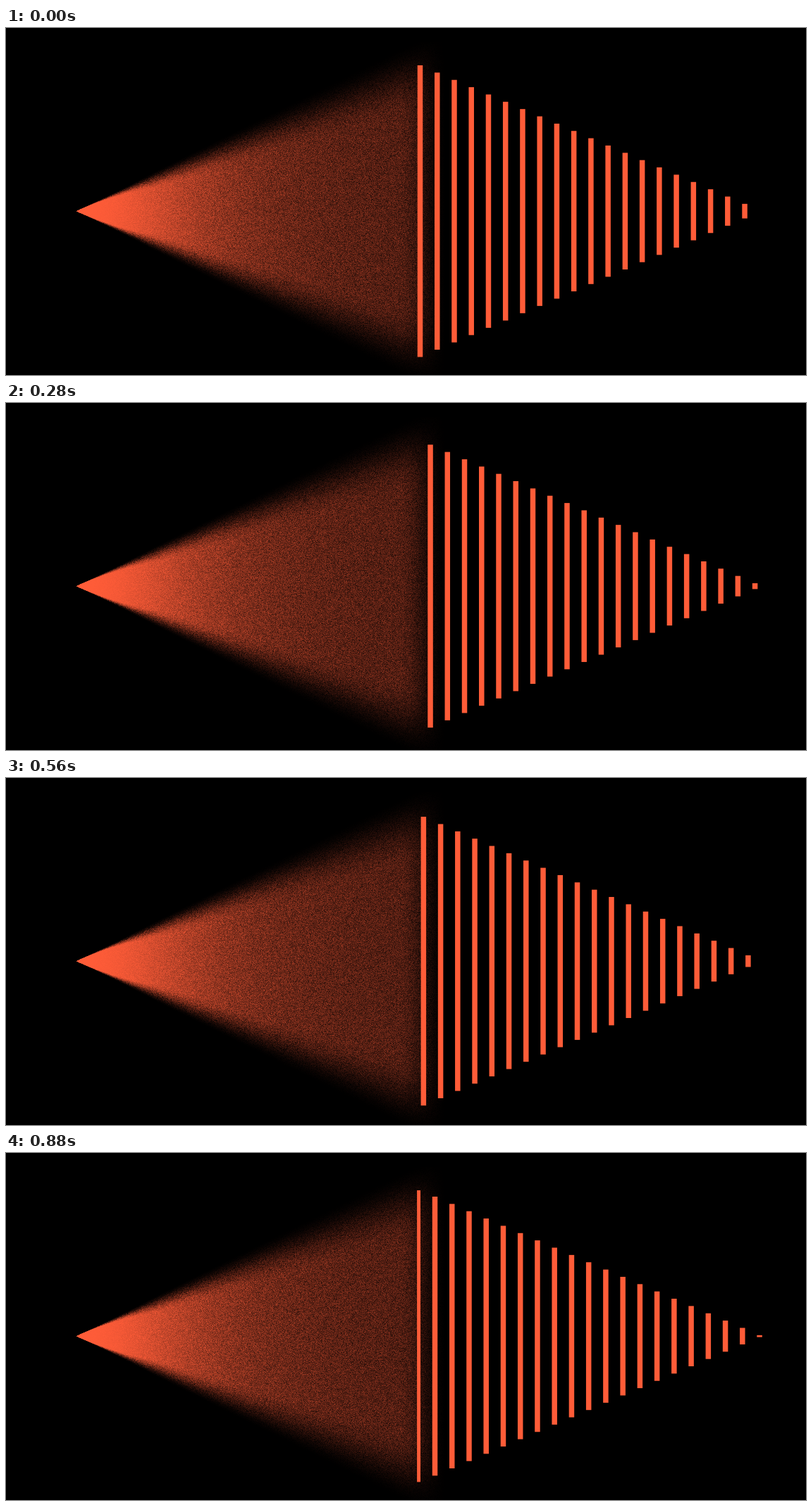
Recreate the animation shown at these times as an HTML page with a canvas. Size 1135 by 493 pixels, loop 920 ms.

```html
<!DOCTYPE html>
<html lang="en">
<head>
<meta charset="utf-8">
<title>Grain cone and bars</title>
<style>
  html, body { margin: 0; width: 100%; height: 100%; overflow: hidden; background: #000; }
  canvas { display: block; width: 1135px; height: 493px; }
</style>
</head>
<body>
<canvas id="stage" width="1135" height="493"></canvas>
<script>
const ctx = document.getElementById('stage').getContext('2d');
const W = 1135, H = 493;
const COLOR = [255, 92, 56];
const LOOP = 920, TICK = 40, TICKS = LOOP / TICK;
const STEPS = 30, CYCLE = 15; // two bar cycles per loop
const MID_Y = 260.2;

const cone = { x: 99, y: 20, w: 530, h: 473 };
const bars = { x: 587.5, gap: 24.24, width: 7.5, half: 207.2, count: 20, left: 583.1 };

function smooth(a, b, v) {
  const t = Math.min(1, Math.max(0, (v - a) / (b - a)));
  return t * t * (3 - 2 * t);
}

// Mean brightness of the cone at a point, before grain.
// The edge is sharp at the tip and softens with distance.
function glow(x, y) {
  const d = x - cone.x;
  const slope = Math.abs(y - MID_Y) / d;
  const blur = Math.min(1, d / 110);
  const inner = 0.43 - 0.14 * blur;
  const outer = 0.46 + 0.045 * blur;
  const body = 0.26 + 0.74 / (1 + (d / 180) ** 2.5);
  return body * (1 - smooth(inner, outer, slope)) * (1 - smooth(556, 626, x));
}

const field = new Float32Array(cone.w * cone.h);
for (let i = 0; i < field.length; i++) {
  const col = i % cone.w, row = Math.floor(i / cone.w);
  field[i] = glow(cone.x + col + 0.5, cone.y + row + 0.5);
}

const image = ctx.createImageData(cone.w, cone.h);

function drawCone(step) {
  const px = image.data;
  let seed = (step + 1) * 0x9E3779B1 | 0;
  const random = () => {
    seed ^= seed << 13;
    seed ^= seed >>> 17;
    seed ^= seed << 5;
    return (seed >>> 0) / 4294967296;
  };
  for (let i = 0; i < field.length; i++) {
    const mean = field[i];
    let v = 0;
    if (mean > 0) {
      const grain = random() + random() - 1;
      v = Math.min(1, Math.max(0, mean + grain * mean * (1 - mean)));
    }
    for (let c = 0; c < 3; c++) px[i * 4 + c] = COLOR[c] * v;
    px[i * 4 + 3] = 255;
  }
  ctx.putImageData(image, cone.x, cone.y);
}

function drawBars(step) {
  const shift = (step % CYCLE) / CYCLE;
  ctx.fillStyle = `rgb(${COLOR})`;
  for (let i = -1; i < bars.count; i++) {
    const n = i + shift;
    const center = bars.x + n * bars.gap;
    const left = Math.max(bars.left, center - bars.width / 2);
    const right = center + bars.width / 2;
    const half = Math.min(bars.half, bars.half * (1 - n / bars.count));
    if (right > left) ctx.fillRect(left, MID_Y - half, right - left, half * 2);
  }
}

let shown = -1;

function draw(now) {
  const tick = Math.floor((now % LOOP) / TICK);
  const step = Math.floor(tick * STEPS / TICKS);
  if (step !== shown) {
    shown = step;
    ctx.fillStyle = '#000';
    ctx.fillRect(0, 0, W, H);
    drawCone(step);
    drawBars(step);
  }
}

let start = null;

function loop(now) {
  if (start === null) start = now;
  draw(Math.max(0, now - start));
  requestAnimationFrame(loop);
}

draw(0);
requestAnimationFrame(loop);
</script>
</body>
</html>
```
